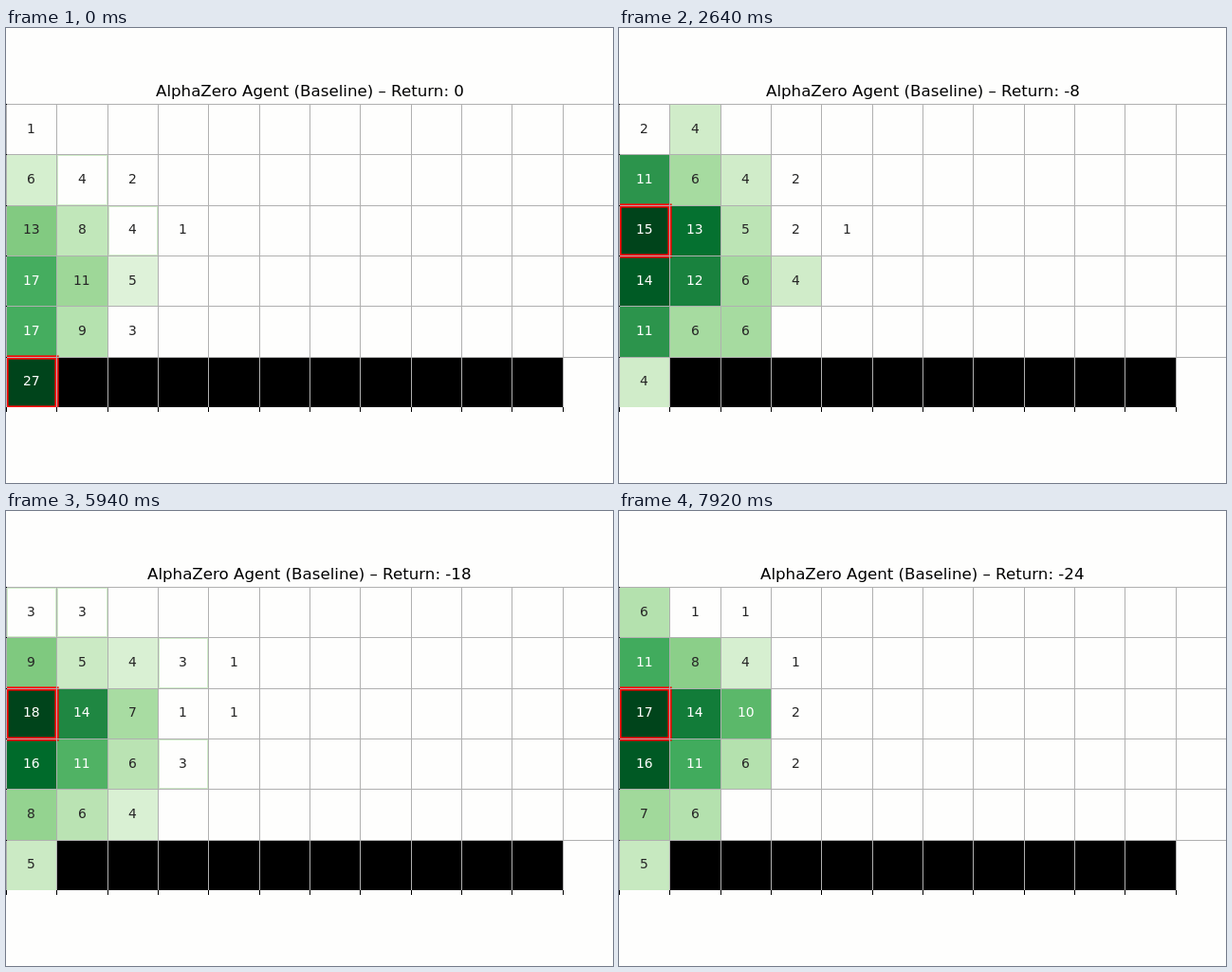
Recreate the animation shown at these times as an HTML page with a canvas. Size 640 px wide and 480 px high, loop 8 s.

```html
<!DOCTYPE html>
<html lang="en">
<head>
<meta charset="utf-8">
<title>Grid agent visit counts</title>
<style>
html, body { margin: 0; width: 100%; height: 100%; overflow: hidden; background: #fefefd; }
canvas { display: block; width: 640px; height: 480px; }
</style>
</head>
<body>
<canvas id="stage" width="640" height="480"></canvas>
<script>
const ctx = document.getElementById('stage').getContext('2d');
const LOOP = 8000, STEP = 330;
const ROWS = 6, COLS = 12, CELL = 640 / COLS, TOP = 80, BOTTOM = 400;
const PAPER = '#fefefd', GRID = '#b0b0b0', INK = '#262626';

// Visit counts at known steps, rows separated by slashes.
const KEYS = [
  [0, '1/6 4 2/13 8 4 1/17 11 5/17 9 3/27'],
  [3, '4 1/12 4 3 1/12 14 8 2 1/17 14 6 3/11 6 5/4'],
  [8, '2 4/11 6 4 2/15 13 5 2 1/14 12 6 4/11 6 6/4'],
  [14, '3 1/7 5 3 2/15 11 10 5 2/16 12 7 4 1/8 6 4 1/5'],
  [18, '3 3/9 5 4 3 1/18 14 7 1 1/16 11 6 3/8 6 4/5'],
  [20, '4 1 1/15 6 3 2/17 13 6 1/15 15 5 3/6 6 4/5'],
  [24, '6 1 1/11 8 4 1/17 14 10 2/16 11 6 2/7 6/5']
].map(([step, text]) => ({
  step, rows: text.split('/').map(row => row.split(' ').map(Number))
}));

const GREENS = ['f7fcf5', 'e5f5e0', 'c7e9c0', 'a1d99b', '74c476', '41ab5d', '238b45', '006d2c', '00441b']
  .map(hex => [0, 2, 4].map(i => parseInt(hex.slice(i, i + 2), 16)));

const gridX = c => Math.round(c * CELL);
const gridY = r => Math.round(TOP + r * CELL);

function green(ratio) {
  const pos = Math.min(ratio, 1) * 8, i = Math.min(7, Math.floor(pos));
  const rgb = GREENS[i].map((v, n) => Math.round(v + (GREENS[i + 1][n] - v) * (pos - i)));
  return `rgb(${rgb})`;
}

function noise(step, r, c) {
  const v = Math.sin(step * 12.99 + r * 78.23 + c * 37.72) * 43758.55;
  return v - Math.floor(v);
}

// Counts drift between known steps, with a small seeded wobble.
function countsAt(step) {
  const next = KEYS.findIndex(k => k.step >= step);
  const b = KEYS[next];
  if (b.step === step) return b.rows;
  const a = KEYS[next - 1], mix = (step - a.step) / (b.step - a.step);
  return b.rows.map((_, r) => Array.from({ length: 5 }, (_, c) => {
    const from = a.rows[r][c] || 0, to = b.rows[r][c] || 0;
    const mean = from + (to - from) * mix;
    const wobble = mean > 2 ? (noise(step, r, c) - 0.5) * 1.8 : 0;
    return Math.round(mean + wobble);
  }));
}

function box(color, x, y, w, h) {
  ctx.fillStyle = color;
  ctx.fillRect(x, y, w, h);
}

function label(text, cx, baseline, size, color) {
  ctx.font = `${size}px "DejaVu Sans", sans-serif`;
  ctx.fillStyle = color;
  ctx.fillText(text, Math.round(cx - ctx.measureText(text).width / 2), baseline);
}

function drawCell(r, c, ratio) {
  const x = gridX(c), y = gridY(r), w = gridX(c + 1) - x, h = gridY(r + 1) - y;
  if (ratio >= 0.13) {
    box(green(ratio), x, y, w, h);
  } else if (ratio >= 0.11) {
    box(green(0.21), x, y, w, h);
    box(PAPER, x + 2, y + 2, w - 3, h - 3);
  }
}

function drawAgent(row) {
  ctx.save();
  ctx.beginPath();
  ctx.rect(0, TOP, 640, BOTTOM - TOP);
  ctx.clip();
  ctx.strokeStyle = '#f00';
  ctx.lineWidth = 4.17;
  ctx.strokeRect(0.5, gridY(row) + 0.5, gridX(1), gridY(row + 1) - gridY(row));
  ctx.restore();
}

function drawGrid() {
  for (let c = 0; c < COLS; c++) {
    box(GRID, gridX(c), TOP, 1, BOTTOM - TOP);
    box('#000', gridX(c), BOTTOM, 1, 5);
  }
  for (let r = 0; r < ROWS; r++) {
    box(GRID, 0, gridY(r), 640, 1);
    box('#000', 0, gridY(r), 1, 1);
  }
}

function draw(step) {
  const counts = countsAt(step);
  const max = Math.max(...counts.flat());
  const ratioOf = n => (n - 1) / (max - 1);
  const each = fn => counts.forEach((row, r) => row.forEach((n, c) => n > 0 && fn(r, c, n)));

  box(PAPER, 0, 0, 640, 480);
  each((r, c, n) => drawCell(r, c, ratioOf(n)));
  box('#000', gridX(1), gridY(5), gridX(11) - gridX(1), BOTTOM - gridY(5));
  drawAgent(Math.max(2, 5 - step));
  drawGrid();
  each((r, c, n) => label(String(n), (c + 0.5) * CELL,
    Math.round(TOP + (r + 0.5) * CELL + 4), 13.889, ratioOf(n) > 0.53 ? '#fff' : INK));
  label(`AlphaZero Agent (Baseline) – Return: ${step ? -step : 0}`, 320, 72, 16.667, '#000');
}

const start = performance.now();
function tick() {
  const t = Math.max(0, performance.now() - start) % LOOP;
  draw(Math.floor(t / STEP));
  requestAnimationFrame(tick);
}
tick();
</script>
</body>
</html>
```
